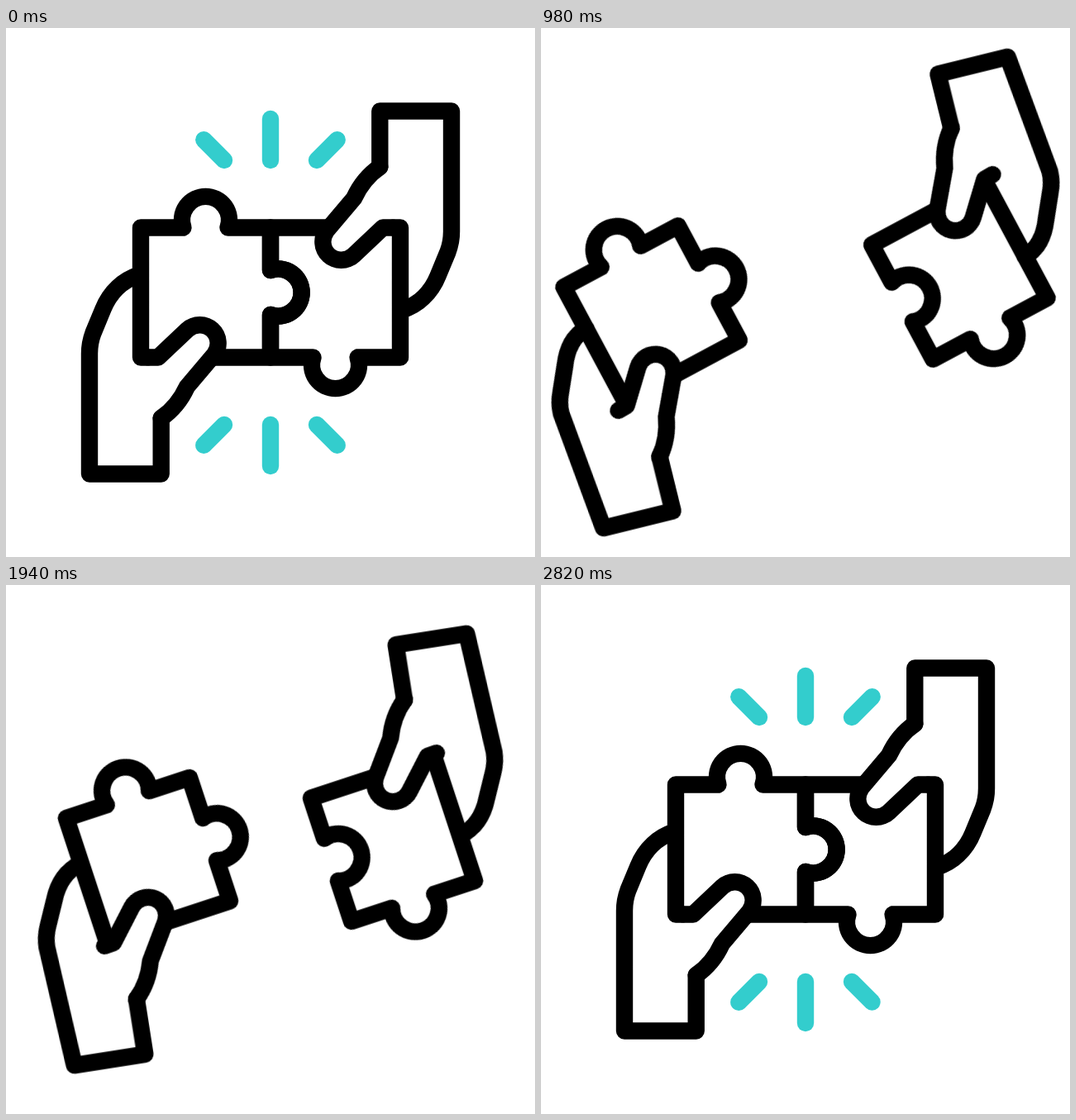
An HTML page that plays this animation: 640 by 640 pixels, repeating every 3.02 s.

```html
<!DOCTYPE html>
<html lang="en">
<head>
<meta charset="utf-8">
<title>Puzzle hands</title>
<style>
  @property --trim {
    syntax: "<length>";
    inherits: true;
    initial-value: 0px;
  }

  :root { --loop: 3020ms linear infinite; }

  html, body { margin: 0; height: 100%; overflow: hidden; background: #fff; }
  svg { display: block; width: 100%; height: 100%; }
  path {
    fill: none;
    stroke: #000;
    stroke-width: 20.4px;
    stroke-linecap: round;
    stroke-linejoin: round;
  }

  /* Arms: the forearm swings, the hand parts bend on top of it */
  .arm { transform-origin: 359px 678px; animation: swing var(--loop); }
  .palm {
    d: path("M160 299C142 305 126 319 117.5 340L105.5 369Q101 381 101 394L101 539.5L187.7 539.5L187.7 472");
    animation: flex var(--loop);
  }
  .piece { transform-origin: 157px 398px; animation: tilt var(--loop); }
  .tab { d: path("M233 398.5H320V347A28.5 28.5 0 1 0 320 293V241.5H268.5A28.5 28.5 0 1 0 214.5 241.5H163V398.5H171"); }
  .socket { d: path("M233 398.5H320V347A28.5 28.5 0 1 1 320 293V241.5H268.5A28.5 28.5 0 1 0 214.5 241.5H163V398.5H171"); }
  .thumb {
    d: path("M172.5 398.5H184L219.5 365A22.2 22.2 0 0 1 252 395L219 434Q208 458 187.7 472");
    fill: #fff;
    transform-origin: 187.7px 472px;
    animation: pinch var(--loop);
  }

  @keyframes swing {
    0% { transform: rotate(0deg); animation-timing-function: cubic-bezier(.25, 0, .5, 1); }
    33.11% { transform: rotate(-13.8deg); }
    42.05% { transform: rotate(-13.8deg); animation-timing-function: cubic-bezier(.9, 0, .8, 1); }
    74.5%, 100% { transform: rotate(0deg); }
  }
  @keyframes tilt {
    0% { transform: rotate(0deg); animation-timing-function: ease; }
    33.11% { transform: rotate(-14.4deg); }
    42.05% { transform: rotate(-14.4deg); animation-timing-function: cubic-bezier(.9, 0, .8, 1); }
    74.5%, 100% { transform: rotate(0deg); }
  }
  @keyframes pinch {
    0% { transform: rotate(0deg); animation-timing-function: ease; }
    33.11% { transform: rotate(-16.3deg); }
    42.05% { transform: rotate(-16.3deg); animation-timing-function: cubic-bezier(.9, 0, .8, 1); }
    74.5%, 100% { transform: rotate(0deg); }
  }
  @keyframes flex {
    0% { animation-timing-function: ease; }
    33.11% {
      d: path("M138 300C122 305 110 318 103 337L90 368Q84.5 380 84.5 393L101 539.5L187.7 539.5L187.7 472");
    }
    42.05% {
      d: path("M138 300C122 305 110 318 103 337L90 368Q84.5 380 84.5 393L101 539.5L187.7 539.5L187.7 472");
      animation-timing-function: cubic-bezier(.9, 0, .8, 1);
    }
    74.5%, 100% {
      d: path("M160 299C142 305 126 319 117.5 340L105.5 369Q101 381 101 394L101 539.5L187.7 539.5L187.7 472");
    }
  }

  /* Rays: each row is trimmed as one run; negative erases, positive is still to draw */
  .top { animation: trim-top var(--loop); }
  .low { animation: trim-low var(--loop); }
  .rays path {
    --len: 35px;
    --from: 0px;
    stroke: #33cdcd;
    stroke-dasharray: var(--len) 999px;
    stroke-dashoffset: calc(
      var(--len)
      - clamp(-1px, 120px - var(--trim) - var(--from), var(--len))
      - clamp(0px, 0px - var(--trim) - var(--from), var(--len) + 1px));
  }
  .rays path:nth-child(2) { --len: 50px; --from: 35px; }
  .rays path:nth-child(3) { --from: 85px; }

  @keyframes trim-top {
    0% { --trim: 0px; animation-timing-function: cubic-bezier(.333, 0, .667, 1); }
    26.7% { --trim: -122px; animation-timing-function: step-end; }
    70.6% { --trim: 122px; animation-timing-function: cubic-bezier(.333, 0, .667, 1); }
    89.2%, 100% { --trim: 0px; }
  }
  @keyframes trim-low {
    0% { --trim: 0px; }
    4.9% { --trim: 0px; animation-timing-function: cubic-bezier(.333, 0, .667, 1); }
    31.6% { --trim: -122px; animation-timing-function: step-end; }
    75.5% { --trim: 122px; animation-timing-function: cubic-bezier(.333, 0, .667, 1); }
    94%, 100% { --trim: 0px; }
  }
</style>
</head>
<body>
<svg viewBox="0 0 640 640">
  <g class="rays top">
    <path d="M264 160L239.3 135.3"/>
    <path d="M320 160V110"/>
    <path d="M376 160L400.7 135.3"/>
  </g>
  <g class="rays low">
    <path d="M264 480L239.3 504.7"/>
    <path d="M320 480V530"/>
    <path d="M376 480L400.7 504.7"/>
  </g>
  <g class="arm">
    <path class="palm"/>
    <path class="piece tab"/>
    <path class="thumb"/>
  </g>
  <g transform="rotate(180 320 320)">
    <g class="arm">
      <path class="palm"/>
      <path class="piece socket"/>
      <path class="thumb"/>
    </g>
  </g>
</svg>
</body>
</html>
```
